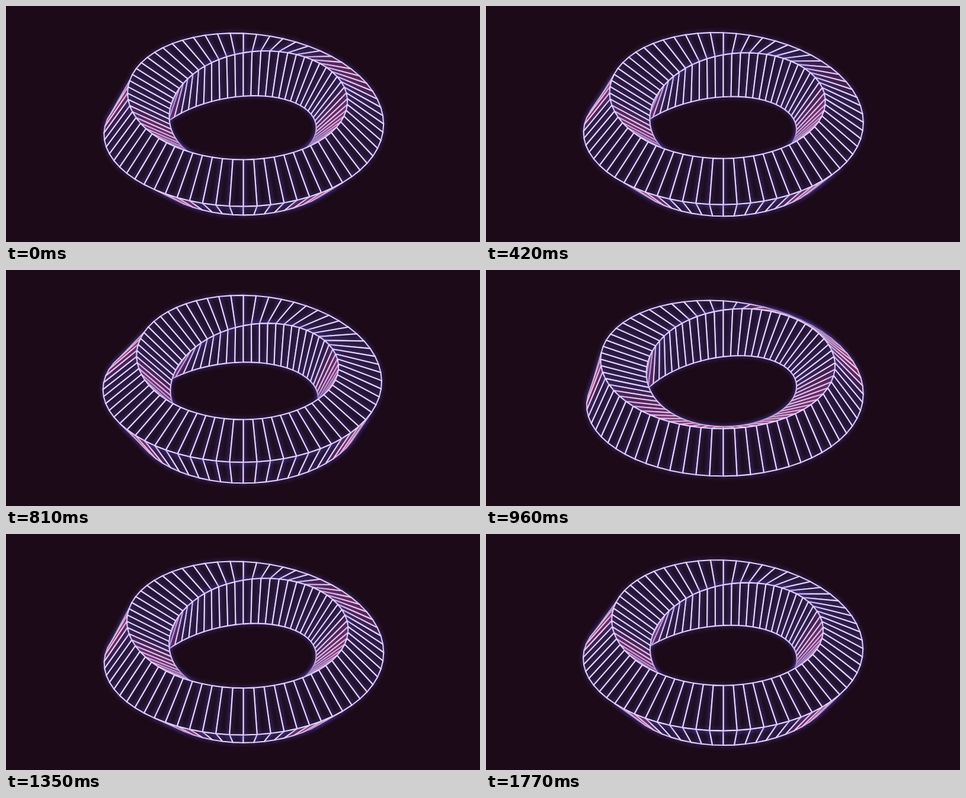
An HTML page with a canvas that plays this animation: 800 px wide and 400 px high, repeating every 1.8 s.

```html
<!DOCTYPE html>
<html lang="en">
<head>
<meta charset="utf-8">
<title>Twisted ring</title>
<style>
  html, body { margin: 0; width: 100%; height: 100%; overflow: hidden; background: #1d0a18; }
  canvas { display: block; width: 800px; height: 400px; }
</style>
</head>
<body>
<canvas id="stage" width="800" height="400"></canvas>
<script>
const ctx = document.getElementById('stage').getContext('2d');

const LOOP = 1800, STEP = 30;
const SLICES = 64, SIDES = 4;
const RING = 180, TUBE = 56.9;
const CX = 400.5, CY = 203.5;
const TILT = Math.asin(1 / Math.sqrt(3));
const SIN = Math.sin(TILT), COS = Math.cos(TILT);
const TWIST_START = 0.43, TWIST_SHIFT = 0.015;
const QUARTER = Math.PI / 2;

// time in ms, roll of the cross-section in degrees
const ROLL = [[0, 0], [420, 86.4], [660, 135.8], [960, 193], [1200, 241.2], [1530, 307.2], [1770, 352.7]];

function rollAt(t) {
  let i = 1;
  while (i < ROLL.length - 1 && ROLL[i][0] < t) i++;
  const [t0, r0] = ROLL[i - 1], [t1, r1] = ROLL[i];
  return (r0 + (r1 - r0) * (t - t0) / (t1 - t0)) * Math.PI / 180;
}

// One quarter turn around the ring, fastest on the far left
function twist(a) {
  return TWIST_SHIFT + (a - Math.sin(a - TWIST_START) - Math.sin(TWIST_START)) / 4;
}

function project(a, phi) {
  const rho = RING + TUBE * Math.cos(phi);
  const h = TUBE * Math.sin(phi);
  const near = rho * Math.cos(a);
  return { x: CX + rho * Math.sin(a), y: CY + near * SIN - h * COS, d: near * COS + h * SIN };
}

// Signed screen area, positive when the face looks at the viewer
function frontArea([a, b, c, d]) {
  return ((c.y - a.y) * (d.x - b.x) - (c.x - a.x) * (d.y - b.y)) / 2;
}

function longestSide(pts) {
  return Math.max(...pts.map((p, i) => {
    const q = pts[(i + 1) % pts.length];
    return Math.hypot(q.x - p.x, q.y - p.y);
  }));
}

function mix(from, to, k) {
  return `rgb(${from.map((v, i) => Math.round(v + (to[i] - v) * k))})`;
}

function buildQuads(roll) {
  const quads = [];
  for (let i = 0; i < SLICES; i++) {
    const a0 = i / SLICES * 2 * Math.PI, a1 = (i + 1) / SLICES * 2 * Math.PI;
    const p0 = twist(a0) - roll, p1 = twist(a1) - roll;
    for (let k = 0; k < SIDES; k++) {
      const lo = k * QUARTER, hi = lo + QUARTER;
      const pts = [project(a0, p0 + lo), project(a1, p1 + lo), project(a1, p1 + hi), project(a0, p0 + hi)];
      const area = frontArea(pts);
      if (area <= 0) continue;
      // faces squeezed thin on screen heat up to red
      const heat = Math.min(1, Math.max(0, (8 - area / longestSide(pts)) / 5));
      quads.push({ pts, heat, depth: pts.reduce((s, p) => s + p.d, 0) });
    }
  }
  return quads.sort((q, r) => q.depth - r.depth);
}

function draw(t) {
  ctx.clearRect(0, 0, 800, 400);
  ctx.lineWidth = 2.1;
  ctx.lineJoin = 'round';
  ctx.shadowColor = 'rgb(80, 68, 165)';
  for (const { pts, heat } of buildQuads(rollAt(t))) {
    ctx.beginPath();
    pts.forEach(p => ctx.lineTo(p.x, p.y));
    ctx.closePath();
    ctx.shadowBlur = 0;
    ctx.fillStyle = mix([30, 13, 32], [255, 48, 88], heat * 0.85);
    ctx.fill();
    ctx.shadowBlur = 8;
    ctx.strokeStyle = mix([234, 214, 250], [255, 205, 222], heat);
    ctx.stroke();
  }
}

const start = performance.now();
let shown = -1;
function tick() {
  const t = Math.floor((performance.now() - start) % LOOP / STEP) * STEP;
  if (t !== shown) draw(shown = t);
  requestAnimationFrame(tick);
}
tick();
</script>
</body>
</html>
```
